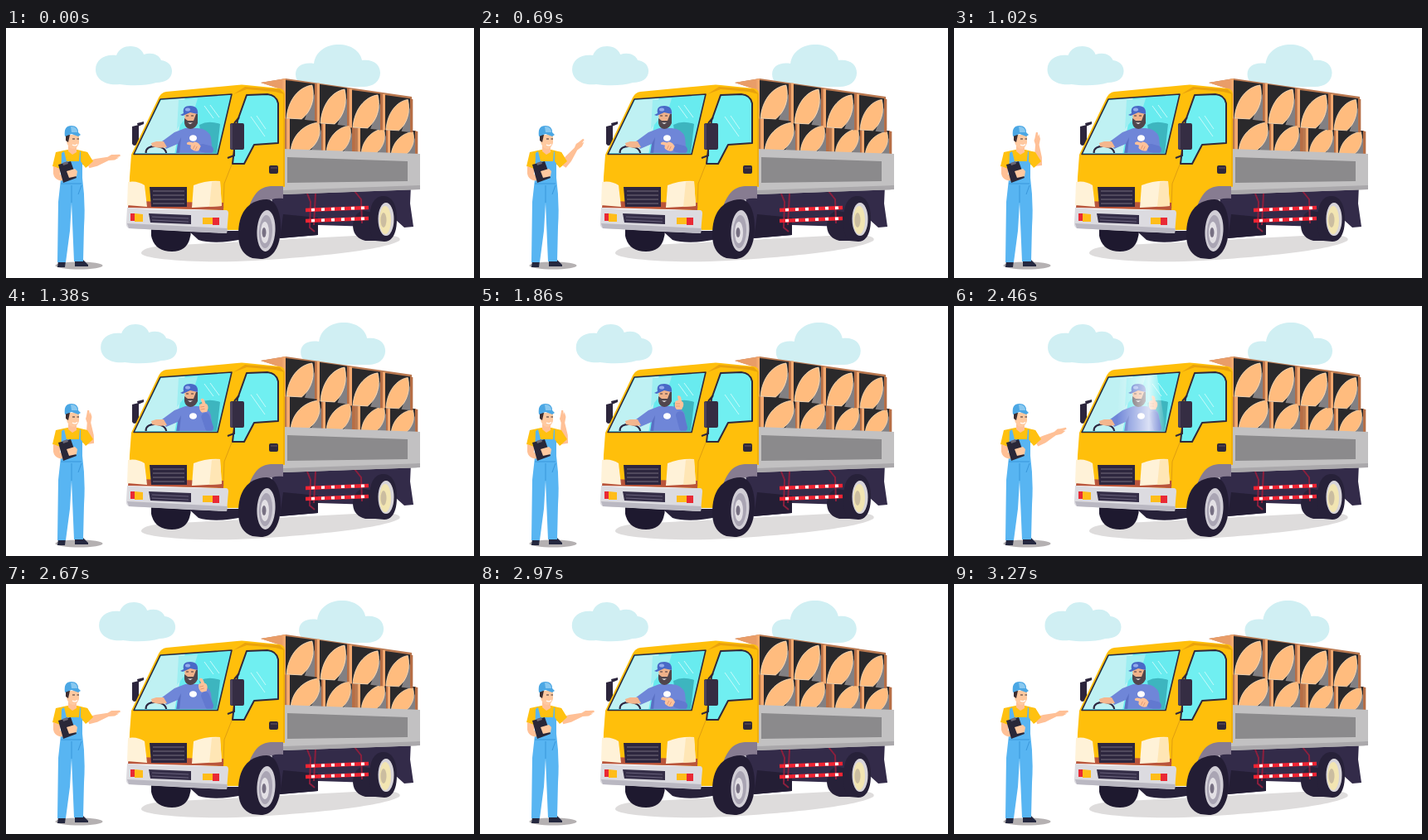
Write an HTML page that moves like this. It is 564 px wide and 302 px high and loops after 3.3 s.

```html
<!DOCTYPE html>
<html lang="en">
<head>
<meta charset="utf-8">
<title>Delivery truck</title>
<style>
html, body { margin: 0; width: 100%; height: 100%; overflow: hidden; background: #fff; }
svg { display: block; width: 100vw; height: 100vh; }
</style>
</head>
<body>
<svg viewBox="0 0 564 302">
<defs>
  <clipPath id="glass"><path d="M187 87L271 81 254 151H155Z"/></clipPath>
  <linearGradient id="shine">
    <stop offset="0" stop-color="#fff" stop-opacity="0"/>
    <stop offset=".65" stop-color="#fff" stop-opacity=".75"/>
    <stop offset="1" stop-color="#fff" stop-opacity="0"/>
  </linearGradient>
</defs>

<g id="clouds" fill="#d0eff3">
  <path d="M108 50C108 38 119 31 133 33 136 25 143 22 150 22 158 22 164 26 166 32 176 29 184 32 187 39 195 40 200 45 200 52 200 61 192 66 181 66 169 70 150 70 137 68 120 70 108 62 108 50Z"/>
  <path d="M349 56C349 46 358 41 371 43 373 28 386 20 401 20 416 20 427 28 429 39 442 37 451 44 451 54 451 65 441 72 428 71L370 71C357 71 349 65 349 56Z"/>
</g>

<path fill="#dedcdc" d="M163 272C163 267 175 264 190 263L440 250C465 249 478 252 474 257 455 268 380 276 300 281 230 285 163 279 163 272Z"/>

<!-- chassis and far wheels -->
<g fill="#272139">
  <path d="M175 242H223Q223 270 200 270 179 270 175 251Z" fill="#1e192f"/>
  <path d="M220 245H286V255Q250 262 232 256Z"/>
  <path d="M318 196L488 190 487 212 491 240 480 241 470 232 440 240 376 238V250L330 254Z" fill="#332b49"/>
  <path d="M334 225L376 229V250L330 254Z" fill="#241e35"/>
  <path d="M418 238Q420 221 432 221L446 224V257H433Q418 253 418 238Z"/>
  <path d="M438 232C438 213 444 203 455 203 466 203 471 215 471 231 471 247 466 258 456 258L445 257C439 252 438 243 438 232Z"/>
</g>
<ellipse cx="458" cy="231" rx="9.5" ry="20" fill="#d8d5da"/>
<ellipse cx="457" cy="232" rx="7" ry="17" fill="#f2e5b2"/>
<ellipse cx="455" cy="232" rx="3.5" ry="9" fill="#cbbda0"/>
<g fill="none" stroke="#8c1f3d" stroke-width="2">
  <path d="M363 200L367 210 366 241 372 246M373 200L371 238M420 197L428 207 429 236"/>
</g>
<g fill="none" stroke-width="4.5">
  <path stroke="#f02433" d="M361 220L437 217M361 233L437 230"/>
  <path stroke="#fff" stroke-width="3.6" stroke-dasharray="4 8" d="M368 219.700L437 217M368 232.700L437 230"/>
</g>

<!-- cargo -->
<path fill="#b97850" d="M307 66L337 61 489 83V125L494 124V153L336 148V75Z"/>
<path fill="#e99d68" d="M307 66L337 61V76Z"/>
<g id="boxes"></g>
<path fill="#c2c1c2" d="M334 146L499 152V195L334 201Z"/>
<path fill="#8b8a8c" d="M339 156L484 161V185L339 187Z"/>
<path fill="#aaa8ab" d="M334 196L499 190V195L334 201Z"/>

<!-- cab -->
<path fill="#2c253c" d="M152 119L160 117V141L154 142 152 140ZM158 115L166 113V116L159 119Z"/>
<path fill="#ffbf0b" d="M148 216L149 180 151 153 184 84Q187 78 193 77L278 69Q284 68 290 69L330 73Q336 74 336 80V192Q312 191 303 205L288 244H266L262 220Z"/>
<path fill="#e9a20c" d="M274 80L288 71 330 74 336 80 324 77 290 74Z"/>
<path fill="none" stroke="#df9e10" d="M272 165L263 188 262 218M335 80V191"/>
<path fill="#877c91" d="M287 245C291 211 300 192 319 191H334V206C317 204 309 212 303 226L296 244Z"/>
<path fill="#231d34" d="M280 249C280 225 290 208 314 207 325 207 331 222 331 241 331 262 323 279 307 279L297 278C285 274 280 264 280 249Z"/>
<ellipse cx="313.500" cy="245" rx="11" ry="25" fill="#d1ced6" transform="rotate(3 313 245)"/>
<ellipse cx="313" cy="246" rx="8" ry="20" fill="#aaa5b4" transform="rotate(3 313 245)"/>
<ellipse cx="312" cy="247" rx="5" ry="13" fill="#e3e0e5"/>
<ellipse cx="311" cy="247" rx="2.500" ry="6" fill="#777083"/>

<path fill="#b9553b" d="M148 209L262 211V220L147 217Z"/>
<path fill="#fff2d8" d="M147 186Q158 184 167 190L170 216 146 214Z"/>
<path fill="#fff2d8" d="M226 190Q241 184 258 185L260 215 224 217Z"/>
<path fill="#ffe6b5" d="M248 186L258 185 260 215 245 216Z"/>
<path fill="#2d263e" d="M173 192H218V216H175Z"/>
<path fill="none" stroke="#756c7d" d="M177 197H215M177 202H215M177 207H215M177 212H215"/>
<path fill="#dcdbe0" d="M146 217L170 219 265 220Q268 220 268 224L266 248 221 246 148 242Q144 240 145 234Z"/>
<path fill="#bab8c2" d="M146 236L267 242 266 248 148 242Z"/>
<path fill="#352e48" d="M172 224L223 226V237L174 235Z"/>
<path fill="none" stroke="#67607a" d="M176 228L220 230M176 232L220 234"/>
<path fill="#e92935" d="M150 224H155V233H150ZM249 229H257V238H249Z"/>
<path fill="#ffbd19" d="M155 224L165 225V234H155ZM237 229H249V237H237Z"/>

<!-- windscreen and driver -->
<path fill="#68ebef" d="M186 86L272 80 255 152H154Z"/>
<g clip-path="url(#glass)">
  <path fill="#bff1f3" d="M187 85L216 83 203 153H152Z"/>
  <path fill="#9eeef1" d="M208 87L231 85 228 95 206 122Z"/>
  <path fill="#3db5bf" d="M233 117Q244 111 258 116L254 152H238Z"/>
  <path fill="none" stroke="#c6fbfb" d="M239 94L250 109M246 93L257 108"/>
  <path fill="#6f86d8" d="M188 137L203 126 216 121H231Q244 122 247 132L249 152H206L207 140 193 146Z"/>
  <path fill="#5a70c3" d="M207 140L211 132 209 152H205Z"/>
  <path fill="none" stroke="#2c2540" stroke-width="2.200" d="M169 153C167 145 174 142 182 143 190 144 194 148 193 153"/>
  <path fill="#f4b68e" d="M190 137L194 144Q184 146 176 143L175 139 181 137Z"/>
  <path fill="#efb189" d="M215 102H231L230 115 223 121 216 115Z"/>
  <path fill="#51464d" d="M215 109L219 112H226L229 104 231 104 231 115Q228 122 222 122 216 121 215 115Z"/>
  <path fill="#fff" d="M219 114.500H225L222 116Z"/>
  <path fill="none" stroke="#40343d" d="M217 106H220M223 106H226"/>
  <path fill="#4969c7" d="M214 103Q212 94 222 94 232 94 231 104L222 102 213 106 210 105Z"/>
  <ellipse cx="219" cy="98.500" rx="3" ry="2" fill="#93abed"/>
  <ellipse cx="225.500" cy="133" rx="4.500" ry="3.800" fill="#fff"/>
  <path id="sleeve" fill="none" stroke="#6279d0" stroke-width="10" stroke-linecap="round"/>
  <g id="fist" fill="#ffc29a">
    <path d="M-5 -2Q-5 -5 -1 -5L-2 -10Q0 -12 2 -9L3 -4Q6 -3 5 2L3 6H-3Q-6 3 -5 -2Z"/>
    <path d="M-4 -1H1M-4 2H1" stroke="#d98f69" stroke-width=".7"/>
  </g>
  <path id="glare" fill="url(#shine)" d="M-35 78H8L20 154H-40Z"/>
</g>
<path fill="none" stroke="#30283b" stroke-width="1.600" stroke-linejoin="round" d="M186 86L272 80 255 152.500H154Z"/>

<!-- side door -->
<path fill="#70eff1" stroke="#30283b" stroke-width="2" stroke-linejoin="round" d="M290 81L315 80Q326 81 328 91V139L299 141 287 164H273L279 112Z"/>
<path fill="none" stroke="#c6fbfb" d="M295 107L312 131M302 106L313 122"/>
<path fill="none" stroke="#30283b" stroke-width="2" d="M275 115L281 108M275 146V154L267 157"/>
<rect x="270" y="115" width="17" height="32" rx="2" fill="#352d43"/>
<path fill="#4c435b" d="M270 117L273 115V147L270 145Z"/>
<rect x="317" y="166" width="11" height="10" rx="2" fill="#302839"/>
<path stroke="#665461" d="M319 169H327"/>

<!-- worker -->
<ellipse cx="88" cy="287" rx="28.500" ry="4.500" fill="#b5b1b2"/>
<path fill="#25283f" d="M63 281H72L71 289H62ZM83 279H92L99 286V288H83Z"/>
<path fill="#ffc110" d="M74 147L60 150 56 167 66 171 68 164V180H91V164L97 168 105 162 98 150 86 147Z"/>
<path fill="#ffc096" d="M75 142H85V150L80 153 75 149Z"/>
<path fill="#58b5f2" d="M67 151L70 149 73 161H88L89 149 92 151 92 181Q96 210 94 240L93 282H82L79 211 77 245 72 283H62L63 210 66 183Z"/>
<path fill="none" stroke="#3997db" d="M79 190V211M66 188H91M91 190L87 201"/>
<path fill="#ffc9a0" d="M73 129H88L88 139Q85 147 80 146 74 144 73 137Z"/>
<path fill="#3b2d31" d="M72 129H77L75 138 72 136Z"/>
<path fill="none" stroke="#3b2d31" d="M80 134H83M85.500 134H88"/>
<path fill="none" stroke="#fff" stroke-width="1.400" d="M80 141Q83 143 86 140.500"/>
<path fill="#4ba7e4" d="M71 131Q69 118 79 118 87 118 87 126L90 129 87 131 79 128Z"/>
<path fill="#88c8f0" d="M78 119Q86 119 86 126L79 126Z"/>
<path fill="#ffc096" d="M57 167L65 170 65 177 74 180 72 185 64 184Q58 182 57 176Z"/>
<path fill="#292738" d="M63 165L78 161 85 181 69 187Z"/>
<path fill="#6a6877" d="M68 163L74 161 75 164 69 166Z"/>
<path fill="#ffc9a0" d="M73 173L83 170 86 173 85 179 76 181Z"/>
<path id="forearm" fill="#ffc096" d="M-3 -4L8 -4 23 -2.500 28 -4 31 -3 38 -1.500 38 .5 33 1 36 2 30 3.500 23 2 8 5 -2 5Z"/>
<path fill="#ffc110" d="M90 149L98 150 105 161 96 169 90 161Z"/>
</svg>

<script>
const $ = id => document.getElementById(id);
const LOOP = 3300;
const ramp = (t, start, span) => {
  const u = Math.min(1, Math.max(0, (t - start) / span));
  return u * u * (3 - 2 * u);
};
const mix = (a, b, k) => a + (b - a) * k;

// Each crate: left, top, width, height
const crates = [
  [342, 109, 38, 39], [385, 113, 32, 37], [427, 117, 31, 35], [463, 121, 30, 33],
  [337, 63, 35, 46], [378, 68, 33, 47], [417, 75, 34, 45], [457, 81, 30, 42]
];
$('boxes').innerHTML = crates.map(([x, y, w, h]) => `
  <g transform="translate(${x} ${y}) scale(${w / 100} ${h / 100})">
    <path fill="#f3a970" d="M-10 -3H0V101H-10Z"/>
    <path fill="#2a292b" d="M0 0L100 10V107L0 100Z"/>
    <path fill="#828083" d="M100 35V107L65 104Z"/>
    <path fill="#ffbc7e" stroke="#ffe4c5" stroke-width="2" d="M91 13C45 18 8 52 3 100L55 102C88 83 103 47 91 13Z"/>
    <path fill="#b66e46" d="M100 10L111 12V107H100Z"/>
  </g>`).join('');

function draw(now) {
  const t = now % LOOP;
  const drift = 8 - Math.abs(t - 1800) * 8 / 1800;
  $('clouds').setAttribute('transform', `translate(${drift})`);

  const wave = ramp(t, 353, 716) - ramp(t, 1905, 716);
  $('forearm').setAttribute('transform', `translate(101 164) rotate(${mix(-15, -92, wave)})`);

  const lift = ramp(t, 1000, 500) - ramp(t, 2520, 500);
  const x = mix(228, 240, lift), y = mix(143, 119, lift);
  $('sleeve').setAttribute('d', `M245 147L${x + mix(9, 1, lift)} ${y + mix(2, 13, lift)}`);
  $('fist').setAttribute('transform', `translate(${x} ${y}) rotate(${mix(-65, 0, lift)})`);

  const sweep = (t - 2220) / 440;
  $('glare').setAttribute('transform', `translate(${mix(140, 315, sweep)})`);
  $('glare').setAttribute('opacity', sweep > 0 && sweep < 1 ? 1 : 0);
  requestAnimationFrame(draw);
}
requestAnimationFrame(draw);
</script>
</body>
</html>
```
